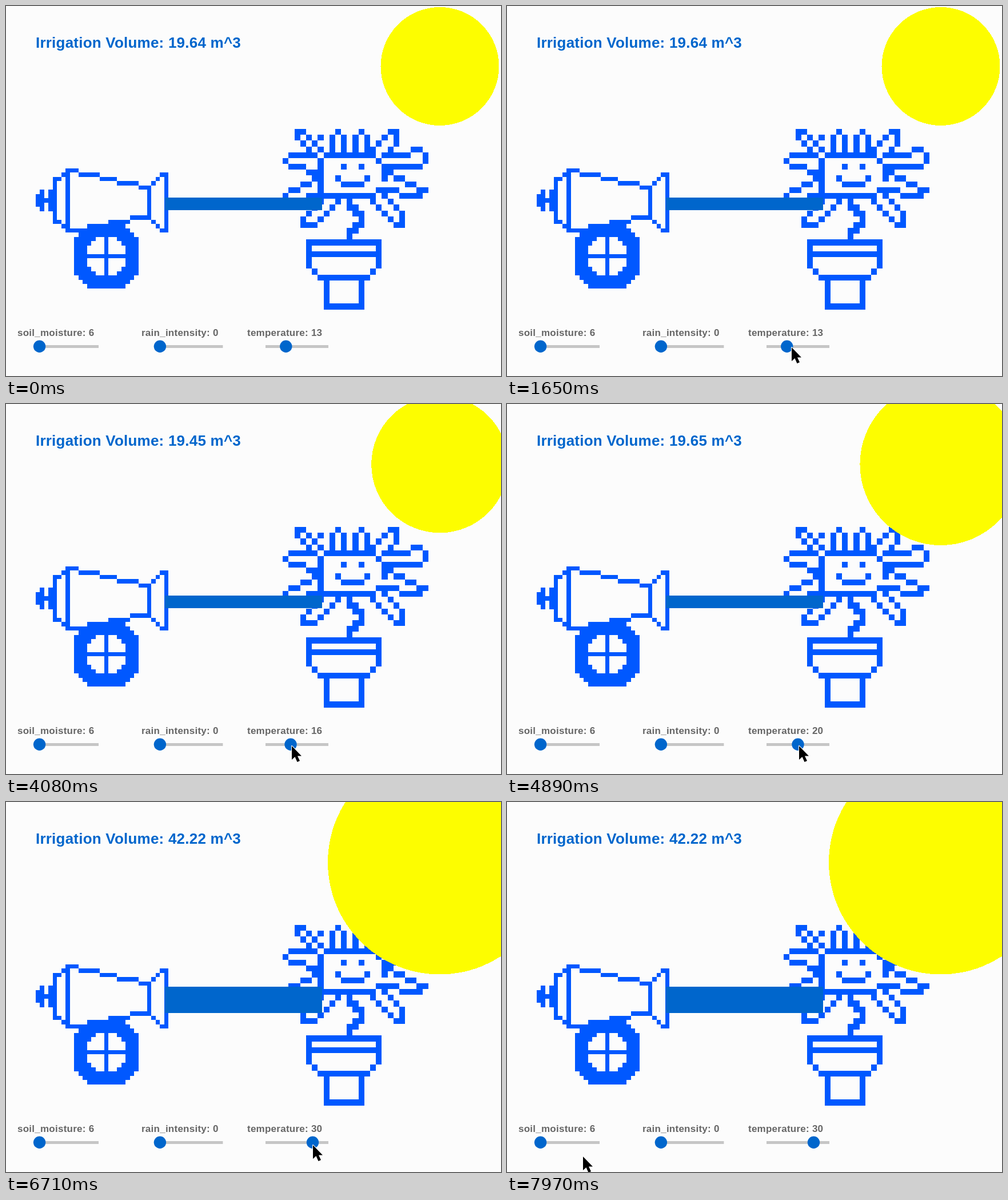
These frames come from a looping animation (866 px wide and 647 px high, 7990 ms). An HTML page:

```html
<!DOCTYPE html>
<html lang="en">
<head>
<meta charset="utf-8">
<title>Irrigation Volume</title>
<style>
  html, body { margin: 0; width: 100%; height: 100%; overflow: hidden; background: #fcfcfc; }
  svg { display: block; width: 866px; height: 647px; }
  text { font-family: "Liberation Sans", Arial, sans-serif; font-weight: bold; }
  #volume { font-size: 26px; letter-spacing: .22px; fill: #0066cc; }
  .label { font-size: 17px; letter-spacing: .25px; fill: #666; }
  .track { fill: #c6c6c6; }
  .knob, #beam { fill: #0066cc; }
  .art { fill: #0058ff; }
  .art, #beam, #sun { shape-rendering: crispEdges; }
</style>
</head>
<body>
<svg id="stage" viewBox="0 0 866 647">
  <rect width="866" height="647" fill="#fcfcfc"/>
  <path id="flower" class="art"/>
  <path id="cannon" class="art"/>
  <rect id="beam" x="278" width="275"/>
  <circle id="sun" cx="759" cy="105.5" fill="#fdfd00"/>
  <text id="volume" x="52" y="73"></text>
  <g id="sliders"></g>
  <path id="cursor" d="M0 0V24L5.5 19L9.5 28L14 26L10 17.5H17Z"
        fill="#000" stroke="#fff" stroke-width="2" paint-order="stroke" stroke-linejoin="round"/>
</svg>
<script>
const $ = id => document.getElementById(id);
const LOOP = 7990;

// A coarse grid on which lines become steps of square cells.
class PixelArt {
  constructor(left, top, size) {
    Object.assign(this, { left, top, size, d: "" });
  }
  cell(c, r) {
    const x = i => Math.round(this.left + i * this.size);
    const y = i => Math.round(this.top + i * this.size);
    this.d += `M${x(c)} ${y(r)}H${x(c + 1)}V${y(r + 1)}H${x(c)}Z`;
  }
  line(x, y, x2, y2) {
    const n = Math.max(Math.abs(x2 - x), Math.abs(y2 - y), 1);
    for (let k = 0; k <= n; k++)
      this.cell(Math.round(x + (x2 - x) * k / n), Math.round(y + (y2 - y) * k / n));
  }
  // Diagonal petal: a tip and two edges running inwards, each after its own gap.
  petal(x, y, dx, dy, gapX, gapY, length) {
    this.line(x, y, x + gapX * dx, y);
    this.line(x, y, x, y + gapY * dy);
    this.line(x + gapX * dx, y, x + (gapX + length) * dx, y + length * dy);
    this.line(x, y + gapY * dy, x + length * dx, y + (gapY + length) * dy);
  }
}

function drawFlower() {
  const art = new PixelArt(484.3, 215, 10.18);
  // Petals
  art.petal(2, 0, 1, 1, 1, 1, 3);
  art.line(6, 1, 5, 2);
  art.petal(19, 0, -1, 1, 1, 2, 3);
  art.petal(3, 16, 1, -1, 2, 1, 3);
  art.line(8, 13, 9, 12);
  art.petal(20, 16, -1, -1, 1, 2, 3);
  art.line(15, 12, 15, 12);
  for (const x of [9, 13]) {
    art.cell(x, 0);
    for (const side of [-1, 1]) art.line(x + side, 1, x + side, 3);
  }
  art.cell(0, 5);
  art.line(1, 4, 5, 4);
  art.line(1, 6, 6, 7);
  art.line(0, 11, 5, 8);
  art.line(17, 4, 21, 4);
  art.line(22, 3, 23, 3);
  art.line(24, 4, 24, 5);
  art.line(17, 6, 23, 6);
  art.line(17, 7, 24, 10);
  art.line(17, 10, 23, 11);
  // Face
  art.line(7, 4, 15, 4);
  art.line(4, 11, 15, 11);
  art.line(6, 5, 6, 10);
  art.line(17, 6, 17, 8);
  art.cell(16, 5);
  art.cell(16, 10);
  for (const side of [-1, 1]) {
    art.cell(11.5 + side * 1.5, 6);
    art.cell(11.5 + side * 2.5, 8);
  }
  art.line(10, 9, 13, 9);
  // Stem sways like a wave
  for (let r = 12; r <= 18; r++) {
    const x = +(12 + Math.cos((r - 15) * Math.PI / 3)).toFixed(3);
    art.line(Math.floor(x), r, Math.ceil(x), r);
  }
  // Pot
  for (const r of [19, 21]) art.line(4, r, 16, r);
  for (const side of [-1, 1]) {
    art.line(10 + side * 6, 19, 10 + side * 6, 23);
    art.cell(10 + side * 5, 24);
    art.line(10 + side * 3, 25, 10 + side * 3, 30);
  }
  art.line(6, 25, 14, 25);
  art.line(7, 30, 13, 30);
  return art.d;
}

function drawCannon() {
  const art = new PixelArt(52, 284, 7.49);
  // Barrel
  art.line(7, 0, 7, 14);
  art.line(7, 0, 26, 4);
  art.line(26, 4, 26, 11);
  art.line(26, 11, 17, 12);
  art.line(7, 14, 11, 14);
  art.line(30, 1, 30, 14);
  art.line(4, 2, 4, 12);
  for (const side of [-1, 1]) {
    const rim = 7.5 + side * 6.5, breech = 7 + side * 6;
    art.line(29, rim, 26, rim - side * 3);
    art.cell(6, breech);
    art.cell(5, breech - side);
  }
  // Knob
  art.line(0, 6, 0, 8);
  art.line(0, 7, 3, 7);
  for (const x of [1, 3]) art.line(x, 5, x, 9);
  // Wheel: rounded ring with a cross of spokes
  for (let y = -7; y <= 7; y++) {
    const d = Math.abs(y), outer = Math.min(7, 11 - d), hole = d > 4 ? -1 : Math.min(4, 6 - d);
    for (let x = -outer; x <= outer; x++)
      if (!x || !y || Math.abs(x) > hole) art.cell(16 + x, 20 + y);
  }
  return art.d;
}

function addSlider(name, value, labelX, trackX, max) {
  const g = document.createElementNS("http://www.w3.org/2000/svg", "g");
  g.innerHTML = `<text class="label" x="${labelX}" y="577"></text>
    <rect class="track" x="${trackX}" y="593" width="110" height="5"/>
    <circle class="knob" cy="595.2" r="10.7"/>`;
  $("sliders").append(g);
  const set = v => {
    g.querySelector("text").textContent = `${name}: ${v}`;
    g.querySelector("circle").setAttribute("cx", trackX + v * 110 / max);
  };
  set(value);
  return set;
}

const progress = (t, from, to) => Math.min(1, Math.max(0, (t - from) / (to - from)));
const smooth = u => u * u * (3 - 2 * u);

// Flat while cool, then rising steeply with heat.
const volumeAt = temp =>
  19.41 + 22.81 * Math.exp(.4547 * (temp - 30)) + .0733 * Math.max(0, 16 - temp);

$("flower").setAttribute("d", drawFlower());
$("cannon").setAttribute("d", drawCannon());
addSlider("soil_moisture", 6, 20, 52, 100);
addSlider("rain_intensity", 0, 237, 269.4, 100);
const setTemperature = addSlider("temperature", 13, 422, 454, 40);

function draw(t) {
  const drag = progress(t, 3050, 6300) ** 1.45;
  const heat = 13 + 17 * drag;
  const temperature = Math.round(heat);
  const volume = volumeAt(temperature);
  const height = volume * 1.09;

  const away = (1 - progress(t, 0, 900)) ** 2;
  const aim = 1 - progress(t, 1700, 2500);
  const leave = smooth(progress(t, 7000, 7950));
  const x = 455.8 + 2.72 * heat + 7 * aim + 60 * away - 404 * leave;
  const y = 597 + 3 * drag + 67 * away + 20 * leave ** 3;

  setTemperature(temperature);
  $("volume").textContent = `Irrigation Volume: ${volume.toFixed(2)} m^3`;
  $("sun").setAttribute("r", 103.5 + 5.44 * (temperature - 13));
  $("beam").setAttribute("y", 346 - height / 2);
  $("beam").setAttribute("height", height);
  $("cursor").setAttribute("transform", `translate(${Math.round(x)} ${Math.round(y)})`);
}

const start = performance.now();
function tick() {
  draw((performance.now() - start) % LOOP);
  requestAnimationFrame(tick);
}
tick();
</script>
</body>
</html>
```
